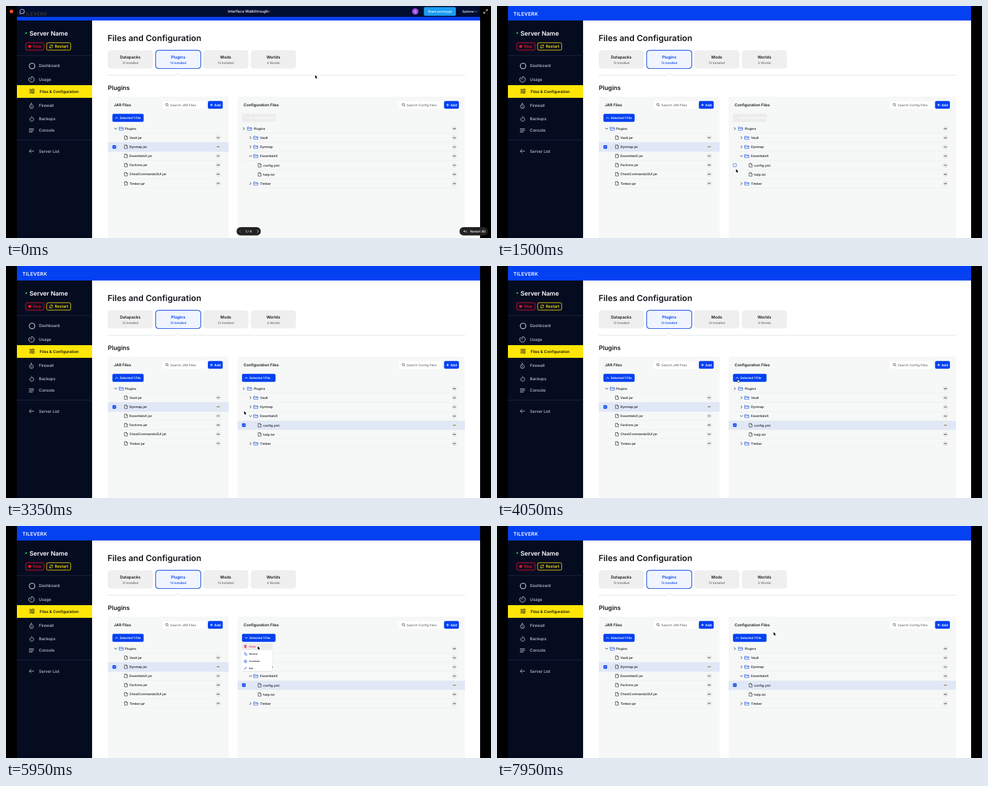
An HTML page for the animation above (8 s loop, 800 px wide and 384 px high).

```html
<!DOCTYPE html>
<html lang="en">
<head>
<meta charset="utf-8">
<title>Server files</title>
<style>
html, body { margin: 0; width: 100%; height: 100%; overflow: hidden; background: #000; }
svg { display: block; width: 800px; height: 384px; }
text { font-family: Inter, "Open Sans", sans-serif; text-rendering: geometricPrecision; white-space: pre; }
</style>
</head>
<body>
<svg id="stage" viewBox="0 0 800 384"></svg>
<script>
const BLUE = '#0341f1', NAVY = '#060c20', YELLOW = '#ffe606', INK = '#15171c';
const LOOP = 8000;

const rect = (x, y, w, h, fill, r = 0, extra = '') =>
  `<rect x="${x}" y="${y}" width="${w}" height="${h}" rx="${r}" fill="${fill}" ${extra}/>`;
const text = (x, y, size, str, fill = INK, weight = 500, anchor = 'start') =>
  `<text x="${x}" y="${y}" font-size="${size}" fill="${fill}" font-weight="${weight}" text-anchor="${anchor}">${str}</text>`;
const path = (d, color, width = 0.9, fill = 'none', extra = '') =>
  `<path d="${d}" fill="${fill}" stroke="${color}" stroke-width="${width}" stroke-linecap="round" stroke-linejoin="round" ${extra}/>`;
const circle = (x, y, r, fill, extra = '') => `<circle cx="${x}" cy="${y}" r="${r}" fill="${fill}" ${extra}/>`;
const group = (id, body, extra = '') => `<g id="${id}" ${extra}>${body}</g>`;
const at = (x, y, body) => `<g transform="translate(${x} ${y})">${body}</g>`;
const hline = (x1, x2, y, color) => path(`M${x1} ${y}H${x2}`, color, 0.6);

const chevrons = {
  up: 'M-2.2 1.1L0 -1.1L2.2 1.1', down: 'M-2 -1L0 1L2 -1',
  right: 'M-1 -2L1 0L-1 2', left: 'M1 -2L-1 0L1 2'
};
const chevron = (dir, x, y, color = INK, width = 0.8) => at(x, y, path(chevrons[dir], color, width));
const folder = (x, y) => at(x, y,
  path('M-3.2 -2.6H-.8L.2 -1.6H3.3V2.5H-3.2ZM-3.2 -.5H3.3', '#2f62e8', 0.8));
const file = (x, y) => at(x, y, path('M-2.2 -2.9H.6L2.3 -1.2V2.9H-2.2ZM.5 -2.8V-1H2.2', '#333', 0.75));
const more = (x, y) => circle(x, y, 4.1, '#e7e9e8') +
  [-1.6, 0, 1.6].map(d => circle(x + d, y, 0.65, '#222')).join('');
const checkbox = (x, y) => rect(x - 2.9, y - 2.9, 5.8, 5.8, BLUE, 0.9) +
  at(x, y, path('M-1.4 .1L-.4 1.1L1.5 -1.1', '#fff', 0.8));
const reload = (x, y, r, color) => at(x, y,
  path(`M${-r * .7} ${-r * .7}A${r} ${r} 0 1 0 ${r * .3} ${-r}M${r * .3} ${-r}L${-r * .25} ${-r * 1.45}M${r * .3} ${-r}L${-r * .2} ${-r * .45}`, color, 0.9));

function sidebar() {
  const pale = '#c3c7d3';
  const items = [['Dashboard', 99], ['Usage', 121.5], ['Firewall', 165], ['Backups', 187], ['Console', 206], ['Server List', 240.3]];
  return rect(18, 24, 124, 360, NAVY) +
    circle(33.5, 44.7, 1.3, '#25e06a') +
    text(38.7, 48.5, 10.1, 'Server Name', '#fff', 600) +
    rect(32.7, 60.8, 30, 12.2, 'none', 2.2, 'stroke="#f5122f" stroke-width="0.9"') +
    rect(36.9, 64.8, 4.3, 4.3, '#f5122f', 0.5) + text(44, 69.3, 6.4, 'Stop', '#f5122f', 600) +
    rect(67, 60.8, 39.7, 12.2, 'none', 2.2, `stroke="${YELLOW}" stroke-width="0.9"`) +
    at(74.4, 67, path('M-2.5 -.5A2.5 2.5 0 0 1 2.2 -1.2M2.4 -2.6V-1H.8M2.5 .5A2.5 2.5 0 0 1 -2.2 1.2M-2.4 2.6V1H-.8', YELLOW, 0.8)) +
    text(80.5, 69.3, 6.4, 'Restart', YELLOW, 600) +
    hline(18, 142, 82, '#30364a') + hline(18, 142, 222, '#30364a') +
    rect(18, 131, 124, 21, YELLOW) +
    at(43, 141, path('M-4 -2.8H0M3 -2.8H4M1.6 -4V-1.6M-4 0H-2.6M0 0H4M-1.2 -1.2V1.2M-4 2.8H.2M3 2.8H4M1.6 1.6V4', '#111', 1)) +
    text(55.6, 143.5, 6.4, 'Files &amp; Configuration', '#111', 600) +
    items.map(([name, y]) => text(54.3, y + 2.4, 6.6, name, pale)).join('') +
    circle(43, 99.3, 4.6, 'none', `stroke="${pale}" stroke-width="1.3"`) +
    at(42, 121.5, path('M-3.2 -3.3A4.6 4.6 0 1 0 0 -4.6V-2.6M0 0L-2.2 -2', pale, 1)) +
    at(42, 165, path('M-.6 -4.2C.2 -2 3.4 -.8 3.2 1.6A3.2 3 0 0 1 -3.2 1.5C-3.2 .1 -2.3 -.8 -2 -1.8L-.9 -.6C-.2 -1.6 -.2 -3 -.6 -4.2ZM0 1V2.6', pale)) +
    reload(42.3, 187.6, 3.3, pale) +
    at(42, 206, path('M-3.7 -2.6H3.7M-3.7 0H3.7M-3.7 2.6H1.5', pale, 1)) +
    at(42, 240.2, path('M3.7 0H-3.5M-.6 -3L-3.6 0L-.6 3', pale, 0.9));
}

function tabs() {
  const list = [['Datapacks', '13 Installed', 205], ['Plugins', '13 Installed', 284],
    ['Mods', '13 Installed', 362.5], ['Worlds', '4 Worlds', 441]];
  return list.map(([name, count, x], i) => {
    const on = i === 1, dy = i === 2 ? 0.4 : 0;
    return rect(x - 37.2, 73.3, 74.5, 30.2, on ? '#eff4fe' : '#efefef', 5, on ? 'stroke="#1f56dd" stroke-width="1.2"' : '') +
      text(x, 87, 6.6, name, on ? BLUE : INK, 600, 'middle') +
      text(x, 95.5 + dy, 5, count, on ? BLUE : '#666', 500, 'middle');
  }).join('') + path('M168 114.7H279.5L284 111.3L288.5 114.7H757', '#d6d8da', 0.7);
}

function panel(x, w, title, searchX, hint, addX) {
  return rect(x, 150, w, 240, '#f6f8f7', 4) +
    text(x + 10, 166, 6.35, title, INK, 600) +
    rect(searchX, 157.5, 71, 12.6, '#fff', 3) +
    at(searchX + 7.7, 163.5, circle(-.4, -.4, 1.9, 'none', 'stroke="#333" stroke-width="0.7"') + path('M1 1L2.3 2.3', '#333', 0.7)) +
    text(searchX + 13, 165.6, 5.3, hint, '#6b6e73', 500) +
    rect(addX, 157.3, 24.5, 12.8, BLUE, 2.5) +
    at(addX + 5.9, 163.8, path('M-1.8 0H1.8M0 -1.8V1.8', '#fff', 0.9)) +
    text(addX + 10.6, 165.8, 5.4, 'Add', '#fff', 600);
}

const selectButton = (x, w, textX, dir) => rect(x, 178.6, w, 13.2, BLUE, 2.2) +
  chevron(dir, x + 7, 185.2, '#fff', 0.9) + text(textX, 187.1, 5.05, 'Selected 1 File', '#fff', 600);

function jarTree() {
  const files = ['Vault', 'Dynmap', 'EssentialsX', 'Factions', 'ChestCommandsGUI', 'Timber'];
  return rect(168, 225.5, 199.3, 15.7, '#e0e7f6') + checkbox(178.6, 233.3) +
    chevron('down', 181, 203) + folder(190.4, 203) + text(196.3, 205.2, 5.3, 'Plugins') +
    hline(184, 356, 210.4, '#e8ebea') +
    files.map((name, i) => {
      const y = 217.8 + i * 15.15;
      return file(198, y) + text(203.5, y + 2, 5.3, name + '.jar') + more(350, y) +
        (i !== 0 && i !== 1 ? hline(184, 356, y + 7.5, '#e8ebea') : '');
    }).join('');
}

function configTree() {
  const rows = [['Plugins', 0, 'right'], ['Vault', 1, 'right'], ['Dynmap', 1, 'right'], ['EssentialsX', 1, 'down'],
    ['config.yml', 2], ['help.txt', 2], ['Timber', 1, 'right']];
  return rows.map(([name, depth, dir], i) => {
    const y = 203 + i * 15.15, x = 392.3 + depth * 11;
    const icon = dir ? chevron(dir, x, y) + folder(x + 9.5 - depth * .7, y) : file(418.5, y);
    return hline(392, 747, y + 7.5, '#e8ebea') + icon +
      text([408.7, 419, 424][depth], y + 2, 5.3, name) + more(739.6, y);
  }).join('');
}

function menu() {
  const blue = '#1c55ee';
  const item = (y, name, color) => text(401, y + 1.3, 3.55, name, color, 600);
  return rect(389.5, 194.5, 50, 46.5, '#0001', 1.5) + rect(389, 194, 50, 46, '#fff', 1.5) +
    group('deleteHover', rect(389, 194, 50, 11.6, '#ebecec', 1)) +
    item(199.2, 'Delete', '#e01a3c') + item(211.9, 'Rename', '#222') +
    item(224, 'Download', '#222') + item(235.3, 'Edit', '#222') +
    at(395, 199.3, path('M-1.3 -1H1.3L1 2.1H-1ZM-1.8 -1.8H1.8', '#e01a3c', 0.7, '#e01a3c88')) +
    at(395, 211.8, path('M-1.9 -1.8H.4M-.8 -1.8V1.6M1.9 -.4V2M.7 2H1.9', blue, 0.8)) +
    circle(395, 224, 2.3, '#dce6ff', `stroke="${blue}" stroke-width="0.6"`) +
    at(395, 224, path('M0 -1.1V.8M-.8 .1L0 .9L.8 .1', blue, 0.6)) +
    at(395, 235.4, path('M-1.7 1.7L-1.3 .3L1.2 -2L2 -1.2L-.4 1.3Z', blue, 0.6));
}

function viewerChrome() {
  const pill = (x, w) => rect(x, 366, w, 13.8, '#222', 6.9);
  return rect(0, 0, 800, 18, '#000', 0, 'opacity="0.79"') +
    circle(9, 9, 2.9, '#f24e1e') +
    at(26.6, 9, path('M-3.5 3.6V0A3.6 3.6 0 1 1 0 3.6Z', '#fff', 0.8)) +
    text(366, 11.4, 6.25, 'Interface Walkthrough', '#fff') +
    chevron('down', 433.6, 9.2, '#ddd', 0.6) +
    circle(675, 9, 5.2, '#a348e4') + text(675, 10.8, 5, 'G', '#fff', 500, 'middle') +
    rect(689.3, 1.8, 52.7, 14.4, '#1c9cf2', 2.5) + text(715.7, 11, 5.2, 'Share prototype', '#fff', 500, 'middle') +
    text(752.5, 11, 5.2, 'Options', '#fff') + chevron('down', 775, 9.3, '#ddd', 0.6) +
    at(791, 9, path('M.8 -.8L3 -3M.9 -3H3V-.9M-.8 .8L-3 3M-.9 3H-3V.9', '#fff', 0.8)) +
    pill(380.3, 40) + chevron('left', 386, 373, '#777') + chevron('right', 415.5, 373, '#fff') +
    text(400, 375, 5.4, '1 / 4', '#fff', 500, 'middle') +
    pill(748, 47) + at(757.5, 373, path('M-.8 -1.8L-2.4 -.2L-.8 1.4M-2.4 -.2H1.2Q2.4 -.2 2.4 1.6', '#fff', 0.7)) +
    text(765.4, 375, 5.1, 'Restart (R)', '#fff');
}

const arrow = path('M0 0V5.3L1.2 4.2L2.1 6.2L3 5.8L2.1 3.9H3.8Z', '#fff', 0.5, '#000', 'paint-order="stroke"');
const hand = path('M-.5 -.2Q0 -.7 .5 -.2V2L2.9 2.6Q3.5 2.8 3.4 3.5L3 5.8H.2L-1.7 3.6Q-1.6 2.9 -.5 3.5Z', '#111', 0.65, '#fff');

stage.innerHTML =
  rect(0, 0, 800, 384, '#000') + rect(18, 0, 764, 384, '#fff') + rect(18, 0, 764, 24, BLUE) +
  `<g letter-spacing="0.25">${text(27, 15.6, 8.1, 'TILEVERK', '#fff', 600)}</g>` + sidebar() +
  text(167.4, 58, 13.8, 'Files and Configuration', INK, 600) + tabs() +
  text(168, 138.6, 10.1, 'Plugins', INK, 600) +
  panel(168, 199.3, 'JAR Files', 258, 'Search JAR Files', 333) +
  selectButton(175.5, 51.5, 187.5, 'up') + jarTree() +
  panel(382, 375, 'Configuration Files', 648, 'Search Config Files', 722.6) +
  group('idleButton', rect(389.3, 178.6, 55.3, 13.2, '#ebeceb', 2.2) +
    chevron('up', 396.3, 185.2, '#fff') + text(401.3, 187.1, 5.05, 'No Selected Files', '#fff', 600)) +
  group('closedButton', selectButton(389.3, 55.3, 401.3, 'up')) +
  group('openButton', selectButton(389.3, 55.3, 401.3, 'down')) +
  group('pickedRow', rect(382, 256.4, 375, 14.8, '#e0e7f6')) +
  configTree() +
  group('hoverBox', rect(389.6, 260.7, 5.4, 5.4, '#e9effd', 0.8, 'stroke="#4f7bea" stroke-width="0.8"')) +
  group('pickedBox', checkbox(392.3, 263.3)) +
  group('menu', menu()) + group('chrome', viewerChrome()) +
  group('cursor', group('arrow', arrow) + group('hand', hand));

// time, x, y of the pointer tip
const track = [
  [0, 510, 114.4], [150, 509, 115], [1050, 398, 262], [1500, 394.3, 270], [1800, 394, 269.5], [2300, 391, 262.5],
  [3100, 391, 262.5], [3800, 397, 186.8], [4300, 397, 186.8], [4900, 407.5, 199], [5300, 407.5, 199],
  [6100, 416, 199], [6850, 416, 199], [7200, 424, 186], [7450, 425, 185.5], [7900, 456.3, 175.5], [8000, 456.3, 175.5]
];
const PICK = 2900, OPEN = 4200, CLOSE = 7400;
const between = (t, a, b) => t >= a && t < b;
const clamp = v => Math.min(1, Math.max(0, v));
const el = id => document.getElementById(id);
const show = (id, on) => el(id).setAttribute('display', on ? 'inline' : 'none');

function pointer(t) {
  const i = track.findIndex((k, n) => n && t <= k[0]);
  const [t0, x0, y0] = track[i - 1], [t1, x1, y1] = track[i];
  const u = (t - t0) / (t1 - t0), e = u * u * (3 - 2 * u);
  return [x0 + (x1 - x0) * e, y0 + (y1 - y0) * e];
}

function render(t) {
  const [x, y] = pointer(t);
  const picked = t >= PICK, open = between(t, OPEN, CLOSE);
  const onRow = y > 256 && y < 271.5;
  const onButton = between(x, 389, 444.6) && between(y, 178.6, 191.8);
  const onBox = Math.abs(x - 392.3) < 1.6 && Math.abs(y - 263.3) < 4 && t > 1800;
  show('idleButton', !picked);
  show('closedButton', picked && !open);
  show('openButton', open);
  show('pickedRow', picked);
  show('pickedBox', picked);
  show('hoverBox', !picked && onRow);
  show('menu', open);
  show('deleteHover', between(y, 194, 205.6));
  show('hand', onBox || onButton && picked);
  show('arrow', !(onBox || onButton && picked));
  el('cursor').setAttribute('transform', `translate(${x} ${y})`);
  el('chrome').setAttribute('opacity', 1 - clamp((t - 100) / 300));
}

const start = performance.now();
function frame(now) {
  render(Math.max(0, now - start) % LOOP);
  requestAnimationFrame(frame);
}
render(0);
requestAnimationFrame(frame);
</script>
</body>
</html>
```
